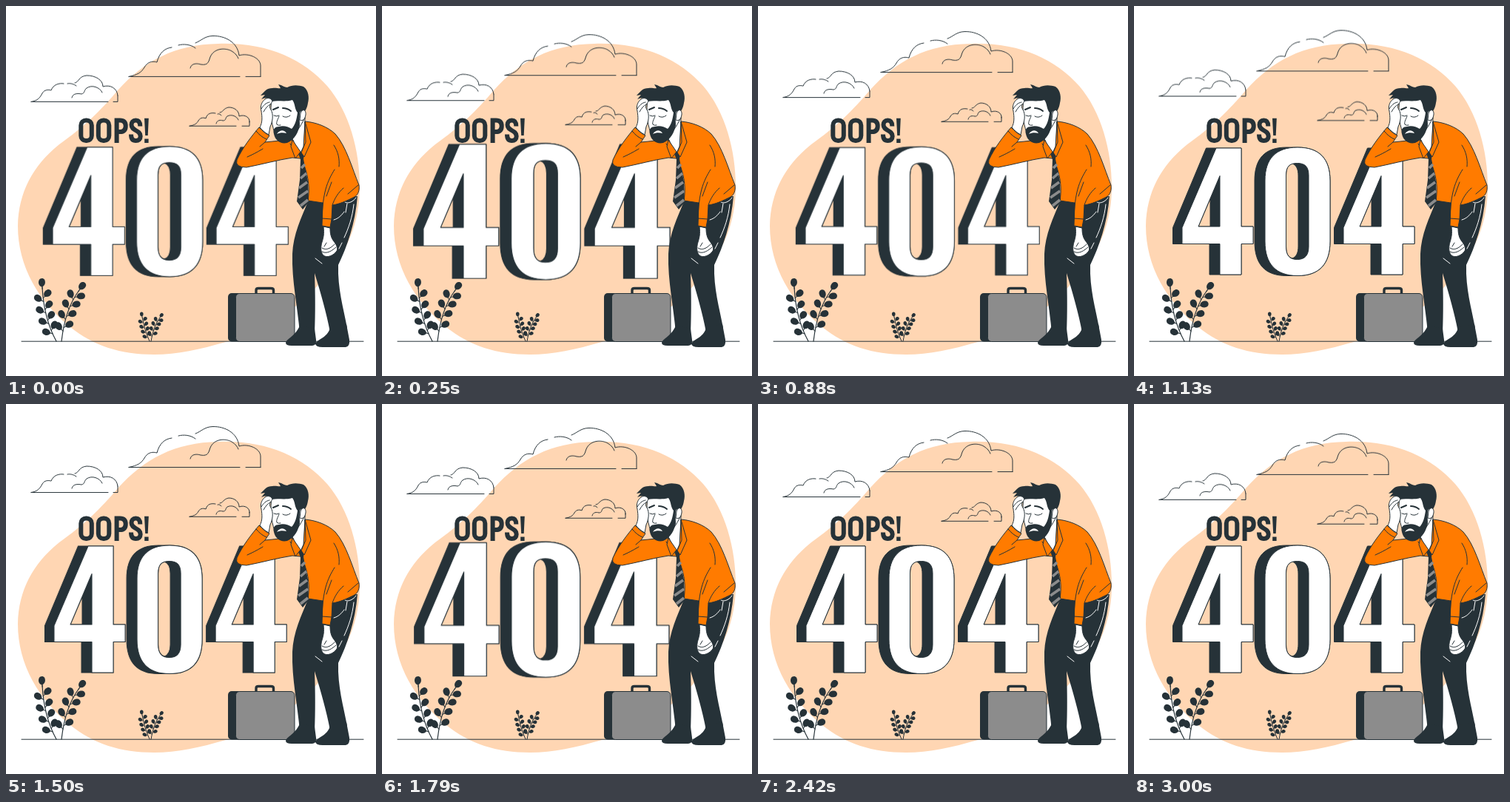
Recreate the animation shown at these times as an HTML page. Size 500 by 500 pixels, loop 3040 ms.

```html
<!DOCTYPE html>
<html lang="en">
<head>
<meta charset="utf-8">
<title>404</title>
<style>
  html, body { margin: 0; width: 100%; height: 100%; overflow: hidden; background: #fff; }
  svg { display: block; width: 100vw; height: 100vh; }
  .line { fill: none; stroke: #263238; stroke-width: 1; stroke-linecap: round; stroke-linejoin: round; }
  .ink { fill: #263238; }
  .skin { fill: #fff; stroke: #263238; stroke-width: 1; stroke-linejoin: round; }
  .shirt { fill: #ff7b00; stroke: #263238; stroke-width: 1; stroke-linejoin: round; }
  .light { fill: none; stroke: #fff; stroke-width: 1; stroke-linecap: round; }
  .bold { fill: none; stroke: #263238; stroke-width: 6; }
  .clouds { animation: drift 3040ms linear -20ms infinite; }
  .digits { transform-origin: 215.7px 277.4px; animation: beat 1520ms linear -20ms infinite; }
  @keyframes drift { 50% { transform: translateY(-10px); } }
  @keyframes beat {
    0%, 30%, 40%, 60%, 100% { transform: scale(1); }
    10%, 50% { transform: scale(1.1); }
  }
</style>
</head>
<body>
<svg viewBox="0 0 500 500" role="img" aria-label="Oops! 404">
  <defs>
    <g id="four">
      <path class="ink" fill-rule="evenodd" stroke="#263238" d="M97.500 192H145V298H161V321.500H145V363H102V321.500H52.500V299.500ZM87 298H103V260.500Z"/>
      <path class="skin" fill-rule="evenodd" d="M111 192H145V298H161V321.500H145V363H116V321.500H65V299.500ZM116 229.500V298H87Z"/>
    </g>
    <g id="leaf">
      <path class="line" d="M0 0H5"/>
      <path class="ink" d="M3 0C4-4.500 9-6 13-4C16-2 16 2 13 4C9 5.500 5 4 3 0Z"/>
    </g>
  </defs>

  <path fill="#ffd6b3" d="M16 297C17 252 36 216 72 187C106 163 128 141 151 114C187 74 228 52 287 51C352 49 401 71 434 108C464 143 478 195 478 244C478 292 462 332 428 370C399 404 354 440 297 454C262 464 232 471 200 471C155 471 118 459 87 434C45 400 16 353 16 297Z"/>

  <g class="clouds line">
    <path d="M166 95.500H316M324 95.500H344M166 95.500C178 93 183 90 187 83C191 76 197 74 204 76C207 64 214 57 224 56M233 53C240 51 250 52 256 57M256 50C264 47 268 41 279 40.500C296 40 313 49 315 67C327 63 345 70 344 82V95.500M249 84C250 78 257 77 263 79C274 81 274 74 276 69C281 57 296 56 305 61C310 64 313 68 314 71"/>
    <path d="M34 129.500H138M145 129.500H151V121M34 129.500C43 128 46 124 49 118C52 113 57 113 61 114C64 106 72 104 78 105M83 105C88 104 92 106 95 108M93 104C99 103 98 95 109 94C121 94 131 100 131 109C141 106 150 111 151 121M89 124C90 118 97 118 102 119C107 118 105 114 109 111C116 106 127 110 130 117"/>
    <path d="M248 162.300H311M319 162.300H329V156M248 162.300C255 161 258 159 260 155C263 150 268 151 270 152C272 145 277 144 283 145M286 146C288 145 290 147 291 148M289 144C293 144 294 138 301 137C309 137 315 142 315 149C323 146 330 151 329 157M284 159C285 154 290 154 293 155C298 155 296 151 299 149C305 146 312 149 314 154"/>
  </g>

  <path class="line" d="M21 453.200H483"/>

  <g class="digits">
    <use href="#four"/>
    <path class="ink" fill-rule="evenodd" stroke="#263238" d="M163 236C163 206 177 191 206 191H221C250 191 265 206 265 236V318C265 349 250 364.500 221 364.500H206C177 364.500 163 349 163 318ZM205.500 229V325C205.500 332 207 339 214 341C220 339 222 332 222 325V229C222 222 220 215 214 213C207 215 205.500 222 205.500 229Z"/>
    <path class="skin" fill-rule="evenodd" d="M177 236C177 206 192 191 221 191S265 206 265 236V318C265 349 250 364.500 221 364.500S177 349 177 318ZM205.500 229V325C205.500 337 210 342.500 220.500 342.500S236 337 236 325V229C236 217 231 212.500 220.500 212.500S205.500 217 205.500 229Z"/>
    <use href="#four" x="218"/>
  </g>

  <g class="bold">
    <rect x="101.300" y="154.500" width="14.500" height="27.500" rx="6.800"/>
    <rect x="124.800" y="154.500" width="14.500" height="27.500" rx="6.800"/>
    <path d="M149.600 185V154.500H154C159.500 154.500 161.700 157.500 161.700 162.200S159.500 170 154 170H149.600"/>
    <path d="M181.300 162.500C181.300 157 179 154.500 175.300 154.500S169.500 157 169.500 160.500C169.500 169 181.700 167.500 181.700 176C181.700 180 179.300 182 175.500 182S169 179.500 169 173.500"/>
  </g>
  <path class="ink" d="M187 151.700H192.800L191.700 175H188.200ZM187.200 179.500H192.600V185H187.200Z"/>

  <g id="plants"></g>

  <g>
    <path fill="none" stroke="#263238" stroke-width="3.400" d="M338 389V384Q338 381.500 341 381.500H358Q361.500 381.500 361.500 384V389"/>
    <rect class="ink" x="300" y="388" width="60" height="65.500" rx="5"/>
    <rect x="310.500" y="388.500" width="79.500" height="65" rx="5" fill="#8c8c8c" stroke="#263238"/>
  </g>

  <g id="man">
    <!-- trousers and shoes -->
    <path class="ink" d="M409 262C399 286 388 309 387 335C386 372 394 405 397 442L417 441C418 416 418 390 417 361C426 390 433 415 438 441L461 435C456 408 448 382 449 350C461 325 472 294 475 257Z"/>
    <path class="ink" d="M397 432C391 446 380 449 378 455Q378 459 386 459H414Q420 458 419 451L417 436ZM438 434C436 447 422 450 418 456Q418 461 428 461H459Q465 460 464 451L460 430Z"/>
    <path class="light" d="M458 265C462 268 470 264 473 259M461 267L459 279M470 268C468 286 463 300 457 313M454 320L450 328M418 341L427 348M443 289C450 287 454 282 457 278"/>

    <!-- tie and body -->
    <path class="skin" d="M388 169L404 151L403 190L397 201L387 184Z"/>
    <path class="shirt" d="M404 156C418 157 435 163 445 173C460 190 468 220 477 242C478 249 476 255 471 258C461 263 450 268 441 269L440 288L438 299L427 297L428 266L408 263C412 238 405 216 396 203L402 190Z"/>
    <path class="line" d="M444 221C434 237 428 252 427 288M441 269C444 260 449 252 456 246M476 242L462 254M427 287L440 288M443 188C449 197 451 207 450 217M440 238L433 257"/>
    <path class="ink" d="M394 196L403 199L402 207L408 237L409 265L401 275L393 264L397 235L398 207Z"/>
    <g stroke="#8c8c8c" stroke-width="3.600">
      <path d="M399 219L404 214M398 233L406 226M396 246L407 238M395 259L408 250M398 270L408 262"/>
    </g>

    <!-- hanging hand -->
    <path class="skin" d="M429 298C430 308 429 313 427 319C425 326 425 333 429 337C434 341 443 337 447 331C449 327 446 322 443 318C439 313 438 307 438 300Z"/>
    <path class="line" d="M427 332C434 336 441 330 446 326M427 327C433 331 439 327 444 322M433 320L430 325"/>

    <!-- raised arm and collar -->
    <path class="shirt" d="M342 164C347 169 351 173 356 175L350 184C362 183 375 181 388 181L398 206L387 205C367 208 346 214 325 218Q309 218 312 208C320 191 331 177 342 164Z"/>
    <path class="line" d="M338 169C342 174 347 178 352 180M350 184L343 190M384 186L391 198M326 204C335 200 342 196 347 193"/>
    <path class="shirt" d="M387 181L398 197L391 206L385 190ZM404 156L405 184L399 198L403 204L412 184Z"/>

    <!-- head -->
    <path class="skin" d="M359 125C357 142 358 157 363 171Q369 184 381 181C391 175 398 162 404 151L401 126Z"/>
    <path class="ink" d="M344 121C350 115 352 111 360 111C365 110 369 112 371 111L368 106C374 107 376 110 380 110C387 106 396 107 402 109C409 114 410 124 408 131C407 138 404 143 401 146L398 142C396 147 397 155 397 161C395 170 391 180 380 185C371 187 364 182 362 173C360 166 364 163 369 163C375 161 381 163 386 166C391 161 393 152 394 144C390 140 391 132 387 127C377 130 368 127 359 129C354 123 349 124 345 126L350 120Z"/>
    <path class="skin" d="M398 145C400 138 406 140 405 147C404 153 401 156 397 154Z"/>
    <path fill="#fff" d="M366 173C370 167 376 167 379 172C375 171 370 171 366 173Z"/>
    <path class="line" d="M362 148Q366 150 369 148M374 149Q379 152 384 148M369 149C367 154 365 157 366 160Q368 162 371 161"/>
    <path class="line" style="stroke-width:2" d="M361 140L368 137M374 138Q380 138 385 142"/>

    <!-- raised hand -->
    <path class="skin" d="M343 164C347 157 346 149 345 142C343 135 346 129 350 126C354 123 359 125 360 129C357 133 355 136 358 140C362 147 360 157 357 163L355 174C350 171 346 168 343 164Z"/>
    <path class="line" d="M345 139C348 134 351 131 356 130M348 143C351 138 353 135 357 133"/>
  </g>
</svg>
<script>
  const plants = document.getElementById('plants');
  const add = (tag, attrs) => {
    const el = document.createElementNS('http://www.w3.org/2000/svg', tag);
    for (const key in attrs) el.setAttribute(key, attrs[key]);
    plants.append(el);
  };

  // A curved stem from a to c (bent towards b) with alternating leaf pairs
  function sprig(a, b, c, pairs, size, width) {
    const at = (t, i) => (1 - t) ** 2 * a[i] + 2 * t * (1 - t) * b[i] + t * t * c[i];
    const slope = (t, i) => 2 * (1 - t) * (b[i] - a[i]) + 2 * t * (c[i] - b[i]);
    const leaf = (t, turn) => {
      const angle = Math.atan2(slope(t, 1), slope(t, 0)) * 180 / Math.PI + turn;
      add('use', { href: '#leaf', transform:
        `translate(${at(t, 0)} ${at(t, 1)}) rotate(${angle}) scale(${size})` });
    };
    add('path', { class: 'line', style: `stroke-width:${width}`, d: `M${a}Q${b} ${c}` });
    for (let i = 0; i < pairs; i++) {
      const t = 0.16 + 0.8 * i / pairs;
      leaf(t, -50);
      leaf(t + 0.06, 50);
    }
    leaf(0.97, 0);
  }

  sprig([68, 453], [51, 422], [49, 380], 4, 0.95, 1.2);
  sprig([75, 453], [80, 409], [99, 384], 4, 0.95, 1.2);
  sprig([194, 453], [187, 438], [184, 420], 4, 0.5, 1);
  sprig([196, 453], [199, 433], [208, 421], 4, 0.5, 1);
</script>
</body>
</html>
```
